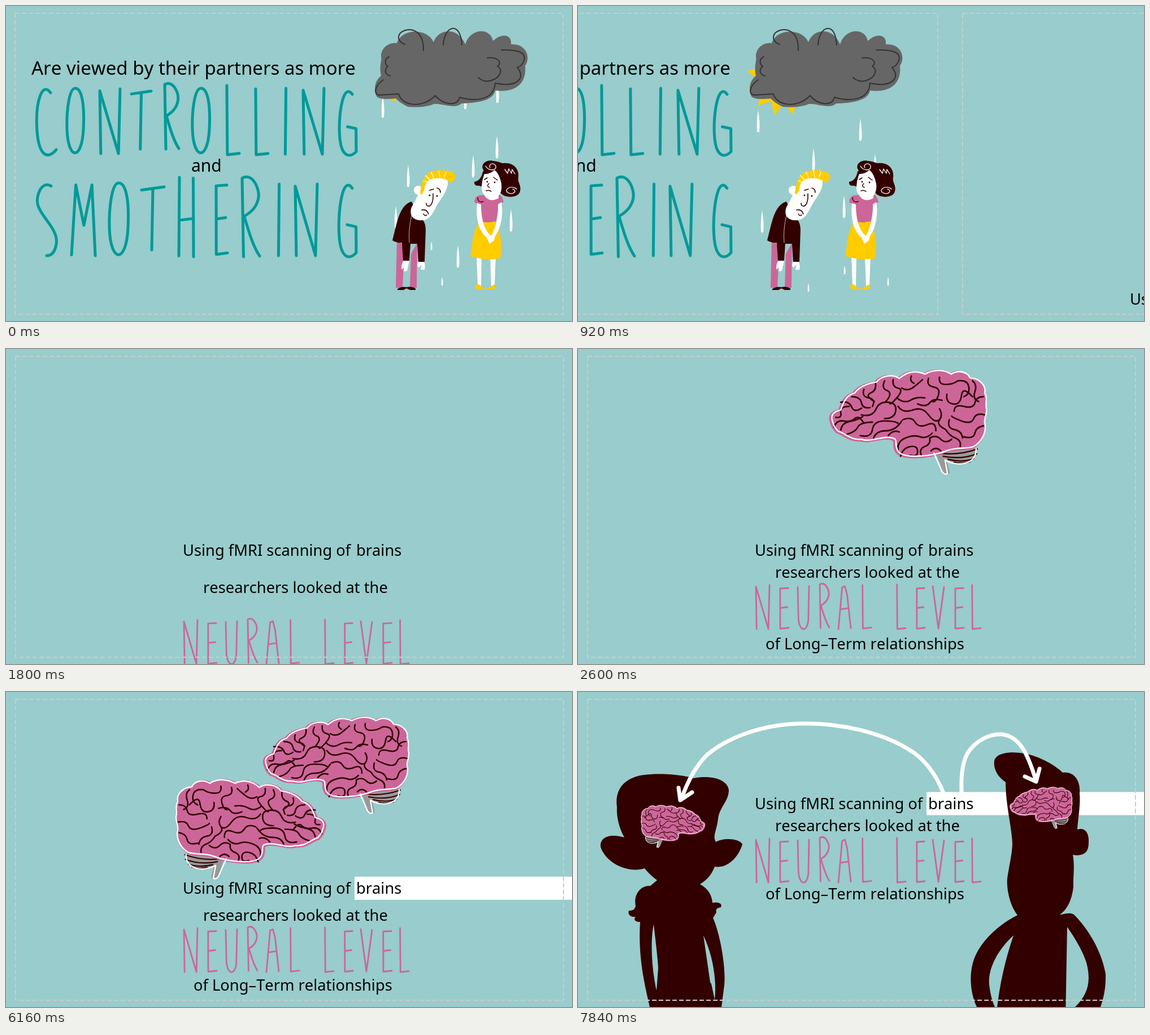
These frames come from a looping animation (1002x559 px, 8000 ms). An HTML page:

```html
<!DOCTYPE html>
<html lang="en">
<head>
<meta charset="utf-8">
<title>Relationships on a neural level</title>
<style>
  html, body { margin: 0; width: 100%; height: 100%; overflow: hidden; background: #9cc; }
  svg { display: block; width: 1002px; height: 559px; }
  text { font: 27.3px "Noto Sans", "Open Sans", sans-serif; font-kerning: none; }
  .big { font-size: 33px; }
  .line { fill: none; stroke-linecap: round; stroke-linejoin: round; }
  .border { fill: none; stroke: #ccc; stroke-width: 2; stroke-dasharray: 8 4; }
  .dark { fill: #300; }
  .white { fill: #fff; }
  .pink { fill: #c69; }
  .gold { fill: #fc0; }
</style>
</head>
<body>
<svg viewBox="0 0 1002 559">
  <defs>
    <path id="cortex" d="M461 130C456 118 463 112 474 110C478 98 483 85 497 82C505 70 520 66 533 64C540 54 558 50 570 58C586 44 600 46 612 51C628 42 645 44 655 51C668 43 682 48 686 57C702 58 713 70 710 82C716 92 710 98 713 108C714 120 707 125 711 135C712 152 702 164 692 170C680 174 665 171 650 176C625 186 574 192 567 176C562 166 567 160 562 157C545 150 524 164 508 158C490 160 482 148 470 145C465 140 462 135 461 130Z"/>
    <g id="brain">
      <path d="M629 178L643 216 653 214 648 194C662 203 697 202 698 171Z" fill="#999"/>
      <path class="line" stroke="#300" stroke-width="2.2" d="M636 181q32 4 62-7M642 186q30 6 55-4M650 191q24 6 42-1M660 196q14 3 26-1"/>
      <use href="#cortex" fill="#c69" stroke="#c69" stroke-width="5" transform="translate(-2 1)"/>
      <g class="line" stroke="#300" stroke-width="2.5">
        <path d="M466 122q10 2 8-8t14-10M474 97q14-2 18 8t16 2M463 138q4-12 16-10t18-4 14 6M474 143q2-12 14-14t22-8M484 150q14-4 18-12t24-8M492 88q14 0 16 10t14 8M512 76q-4 12 8 14t6 14M531 66q2 12-8 16t6 14M546 62q-6 12 4 16t-2 18"/>
        <path d="M508 118q18 4 24-10t24-10M556 98q10 2 8 14t-18 12M506 152q18 4 20-10t20-14 22 4M528 156q4-12 20-12t26-16M552 152q8-10 18-6M560 60q-2 12 8 14t-2 16-12 8M566 90q12 10 22 4t24-4M574 74q10 6 20-2t14-12M590 54q-4 8 4 12M568 104q8 12 24 6t26 8 18 8M576 126q14-6 20 4t20 4 14 10M600 100q14 6 20-2t20-4"/>
        <path d="M618 58q-4 12 8 14t8 14-10 10M636 56q-2 12 10 12t20-6M666 62q16-2 18 10t-8 16M648 84q-2 14 10 16t14-14 18 2M690 62q8 6 4 18t6 16M708 88q-12 0-14 10t-18 6-16 8M710 118q-14-4-18 6t-20 4-16-8M636 108q6 10 0 18t10 16M652 126q-4 14 8 16t14 14M708 136q-12 2-14 12t-18 6M670 170q2-10-8-14t-16-14"/>
        <path d="M568 176q-2-14 12-20t24-2 20-6M572 186q4-14 16-16t12 8-12 6M606 184q-4-10 6-14t8-14M620 156q10-6 18 2t18 0M622 177q8-8 16 0"/>
      </g>
      <g class="line" stroke="#fff" stroke-width="2.2">
        <use href="#cortex"/>
        <path d="M627 181L640 211Q645 218 649 214L645 192C662 203 697 202 696 173"/>
      </g>
    </g>
    <path id="drop" class="white" d="M0-20Q4 5 2 18Q0 22-2 18Q-3 0 0-20Z"/>
  </defs>

  <g id="panel1">
    <text class="big" x="45" y="122">Are viewed by their partners as more</text>
    <text x="328" y="294" style="font-size:30px">and</text>
    <g id="words" class="line" stroke="#099" stroke-width="5"></g>
    <polygon id="sun" class="gold"/>
    <g id="rain"></g>

    <path fill="#666" d="M692 66C700 40 745 38 757 64C765 40 800 36 813 68C822 38 858 38 862 62C880 46 896 52 894 68C920 66 930 90 919 106C922 135 905 155 866 150C862 172 820 172 806 173C795 184 770 172 757 174C745 180 722 180 712 179C700 174 692 166 690 164C676 166 656 166 655 158C650 142 656 130 664 124C660 105 666 98 664 90C664 72 680 64 692 66Z"/>
    <path class="line" stroke="#333" stroke-width="2" d="M706 68C695 64 692 55 698 48C712 36 740 40 739 79M774 69C776 34 805 26 807 69M877 78C905 77 922 82 917 97Q913 107 905 109C921 128 905 145 866 137M852 92C870 90 880 100 870 107C882 114 872 128 862 131C850 137 840 131 836 127M678 90C668 95 672 105 676 107C668 115 672 122 680 124M668 131C652 142 650 158 662 158L695 156C700 176 735 184 760 159C775 177 800 178 803 162C830 170 864 168 866 137"/>

    <g id="man">
      <path class="pink" d="M692 418L690 500H702L706 424ZM717 440L715 500H727L728 420Z"/>
      <path class="dark" d="M693 502Q700 497 709 499Q718 497 725 501V504H715L709 501 704 504H693Z"/>
      <path class="white" d="M704 450Q698 463 701 468L705 463 704 471 710 470 714 452ZM730 452Q726 463 731 464L736 459 734 468H741Q743 458 739 452Z"/>
      <path class="dark" d="M718 347C695 354 692 388 684 416Q692 421 701 420L703 452H714L716 422H728L730 454H741L743 398C743 384 738 378 733 377Z"/>
      <path d="M718 372Q712 398 714 420" class="line" stroke="#fff" stroke-width=".7"/>
      <circle class="white" cx="730" cy="327" r="8"/>
      <path class="white" d="M743 306C736 320 729 338 718 357C712 374 724 382 738 380C752 379 757 364 765 350C776 334 787 318 780 304Z"/>
      <path class="gold" d="M733 332Q736 298 755 293C775 289 795 293 796 302Q795 310 787 314C780 306 765 303 750 308Q742 312 740 328L736 335Z"/>
      <path class="line" stroke="#fff" stroke-width="1.2" d="M739 310L748 314M743 301L750 308M753 295L757 305M766 293L768 303M779 295L776 304"/>
      <path class="line" stroke="#300" stroke-width="1.6" d="M756 333Q757 350 750 355Q744 356 744 350M736 362Q745 360 748 369M750 327L757 325M763 323Q769 324 769 331M739 369Q741 373 745 371"/>
      <circle class="dark" cx="750" cy="336" r="1.5"/><circle class="dark" cx="763" cy="337" r="1.5"/>
    </g>

    <g id="woman">
      <path class="white" d="M833 442H842L841 497H835ZM857 442H867L865 497H859Z"/>
      <path class="gold" d="M831 496Q834 490 842 498L848 502H832ZM849 502L859 498Q867 490 866 499L864 503Z"/>
      <path class="pink" d="M837 336Q828 340 830 349L838 352 840 386H867L873 352 881 348Q879 338 873 334Z"/>
      <path class="gold" d="M839 382Q852 386 866 382C876 400 879 425 875 448Q847 452 822 444C827 420 824 402 839 382Z"/>
      <path class="white" d="M834 350C831 380 838 400 851 411L856 422 864 416 866 408C876 395 881 370 877 348L871 352C872 375 866 395 859 408C846 398 841 375 841 352Z"/>
      <path class="white" d="M847 336Q855 350 872 341V325H847Z"/>
      <path class="dark" d="M846 292C838 282 850 271 863 275C874 276 876 279 880 279C900 277 909 291 907 304C905 313 913 318 910 329C907 342 881 341 875 331L838 319Q828 320 829 312Q841 310 844 294Z"/>
      <path class="white" d="M847 298Q856 299 865 291Q873 297 877 315Q879 331 870 339C858 348 843 338 842 324Q842 310 847 298Z"/>
      <path class="line" stroke="#fff" stroke-width="1.3" d="M849 284C854 293 869 293 867 284C864 276 853 281 857 287M883 290L888 297 890 289 895 297 896 290 901 298M904 325C895 317 881 325 888 331C898 337 906 327 897 325"/>
      <path class="line" stroke="#300" stroke-width="1.5" d="M847 308L852 305M863 304L870 309M855 315Q850 320 856 322M850 328Q855 326 859 329M835 340Q836 350 845 347"/>
      <circle class="dark" cx="852" cy="312" r="1.4"/><circle class="dark" cx="865" cy="313" r="1.4"/>
    </g>
    <rect class="border" x="16" y="13" width="970" height="534"/>
  </g>

  <g id="panel2">
    <g id="line1">
      <rect id="bar" class="white" x="617" y="336.5" width="440" height="41"/>
      <text x="313" y="367">Using fMRI scanning of</text>
      <text x="620" y="367">brains</text>
    </g>
    <text id="line2" x="349" y="406">researchers looked at the</text>
    <g id="neural" class="line" stroke="#c69" stroke-width="2.8"></g>
    <text id="line4" x="332" y="530">of Long–Term relationships</text>
    <path id="manShade" class="dark" d="M737 122C740 108 765 104 795 110C820 116 845 130 858 143C880 140 890 160 888 180C890 200 885 225 884 244C898 240 905 250 904 268C904 285 895 292 876 289C880 310 876 330 877 345C875 365 868 385 853 395C860 395 870 390 878 395C895 412 925 450 934 500C935 525 930 545 925 559L910 640H864L880 559C905 535 908 510 900 480C892 455 875 430 866 417L862 640H735L742 559C748 510 758 470 771 432C745 455 725 490 728 520Q731 545 738 559L745 640H730L706 559C692 530 692 490 705 465C720 435 750 410 778 396C765 380 758 350 760 330C764 305 768 290 769 270C768 240 757 200 757 160C742 150 735 135 737 122Z"/>
    <path id="womanShade" class="dark" fill-rule="evenodd" d="M69 205C64 170 85 147 130 146C165 144 195 150 205 153C235 147 266 155 267 175C266 195 250 205 248 225C245 248 238 255 244 266C258 258 285 260 291 270C285 292 265 314 242 310C236 325 228 334 216 341C232 350 237 362 238 374C250 372 256 376 253 382C248 383 243 384 245 391L239 401C252 430 262 490 259 520L254 559V640H135L127 559C118 520 106 470 110 408C100 408 98 403 102 399C92 400 88 394 90 388C98 388 100 386 102 380C98 360 110 343 128 344L140 334C128 325 122 318 118 313C90 322 50 305 40 275C38 258 55 250 82 258C72 240 68 220 69 205ZM134 412C137 440 141 470 142 490L139 530C130 490 128 440 134 412ZM222 432C238 465 246 510 242 546L236 518 234 515Z"/>
    <use id="brainR" href="#brain"/>
    <use id="brainL" href="#brain"/>
    <g class="line" stroke="#fff" stroke-width="7">
      <path id="arrowL" d="M646 177C635 150 618 125 595 108C540 70 460 55 400 56C330 56 265 80 228 112C205 135 190 170 183 190M178 170L181 192 202 178"/>
      <path id="arrowR" d="M679 177C678 150 680 125 690 108C705 85 730 74 750 75C780 78 795 105 811 158M791 150L811 159 817 136"/>
    </g>
    <rect class="border" x="17" y="13" width="970" height="534"/>
  </g>
</svg>
<script>
const LOOP = 8000, PANEL = 1013;
const $ = id => document.getElementById(id);
const move = (id, x, y) => $(id).setAttribute('transform', `translate(${x} ${y})`);
const mix = (a, b, k) => a + (b - a) * k;
const span = (t, start, length) => Math.min(1, Math.max(0, (t - start) / length));
const out = (t, start, length = 800) => 1 - (1 - span(t, start, length)) ** 3;
const back = (t, start, length = 800) => {
  const u = span(t, start, length) - 1;
  return 1 + 2.70158 * u ** 3 + 1.70158 * u ** 2;
};

// Tall hand-lettered capitals on a 100 x 100 cell.
const GLYPHS = {
  A: 'M0 100L30 3 52 0 70 20 100 98M15 54L80 51',
  C: 'M72 6C30 -12 0 20 4 55C8 102 55 110 100 93',
  E: 'M95 3L5 4 6 99 100 97M8 50L85 48',
  G: 'M76 5C25 -15 0 40 8 70C15 105 65 105 97 95L96 59 50 56',
  H: 'M4 0L0 99M98 1L100 100M4 54L96 52',
  I: 'M60 0L40 100',
  L: 'M4 0L8 100 100 98',
  M: 'M0 99L18 2 52 58 86 2 100 100',
  N: 'M5 100L0 3 92 100 100 0',
  O: 'M50 0C15 0 0 35 3 62C8 110 88 112 97 62C104 25 88 0 50 0Z',
  R: 'M8 100L0 1C60 -6 100 14 94 25Q85 40 12 49C40 70 65 88 100 99',
  S: 'M72 2C25 -6 -5 16 6 28C20 45 105 62 98 82Q90 100 50 100',
  T: 'M0 5L100 0M50 3L45 100',
  V: 'M0 0L50 100 100 2',
  U: 'M0 2L6 75C15 108 85 108 94 78L100 0'
};
function letter(host, [char, x, y, w, h]) {
  let isX = false;
  const d = GLYPHS[char].replace(/-?\d+/g, n => {
    isX = !isX;
    return isX ? x + n * w / 100 : y + n * h / 100;
  });
  $(host).insertAdjacentHTML('beforeend', `<path d="${d}"/>`);
}
[
  ['C', 53, 147, 36, 116], ['O', 107, 146, 31, 116], ['N', 166, 147, 36, 115], ['T', 222, 151, 35, 103],
  ['R', 281, 138, 25, 116], ['O', 329, 146, 32, 116], ['L', 390, 141, 23, 123], ['L', 441, 147, 23, 117],
  ['I', 492, 146, 6, 117], ['N', 526, 146, 37, 117], ['G', 588, 151, 33, 113]
].forEach(g => letter('words', g));
[
  ['S', 54, 317, 36, 126], ['M', 116, 315, 42, 128], ['O', 182, 314, 35, 129], ['T', 240, 321, 40, 112],
  ['H', 306, 304, 26, 141], ['E', 371, 314, 21, 128], ['R', 418, 304, 31, 141], ['I', 480, 316, 6, 127],
  ['N', 512, 316, 39, 127], ['G', 587, 317, 34, 127]
].forEach(g => letter('words', g));
[
  ['N', 315, 419, 24, 78], ['E', 357, 422, 16, 75], ['U', 389, 421, 20, 76], ['R', 428, 417, 17, 78],
  ['A', 461, 421, 22, 76], ['L', 503, 419, 16, 77], ['L', 564, 418, 16, 79], ['E', 599, 422, 15, 75],
  ['V', 628, 421, 20, 75], ['E', 667, 422, 16, 75], ['L', 697, 419, 16, 78]
].forEach(g => letter('neural', g));

// Two showers take turns; each drop is x, y and optional size.
const FALL = 0.4, TURN = 368;
const drops = [
  [667, 178], [813, 163], [870, 152], [869, 250], [827, 284], [712, 301],
  [690, 374], [894, 380], [753, 425, .4], [800, 444], [772, 488, .4],
  ...[
    [668, 204], [849, 219], [766, 272], [875, 282], [777, 308],
    [675, 382], [820, 356], [821, 468, .4], [757, 499, .4], [898, 488, .4]
  ].map(([x, y, size]) => [x, y - TURN, size])
].map(([x, y, size = 1]) => {
  const el = document.createElementNS('http://www.w3.org/2000/svg', 'use');
  el.setAttribute('href', '#drop');
  $('rain').append(el);
  return { el, x, y, size };
});

$('sun').setAttribute('points', Array.from({ length: 24 }, (_, i) => {
  const a = (6 + i * 15) * Math.PI / 180, r = i % 2 ? 34 : 50;
  return `${r * Math.cos(a)},${r * Math.sin(a)}`;
}).join(' '));

function placeBrain(id, x, y, scale, flip) {
  $(id).setAttribute('transform',
    `translate(${x} ${y}) scale(${flip * scale} ${scale}) translate(-585.5 -131)`);
}

function draw(t) {
  const scroll = PANEL * out(t, 787, 1020);
  move('panel1', -scroll, 0);
  move('panel2', PANEL - scroll, 0);

  const glow = 1 + .3 * Math.sin(Math.PI * t / 1840) ** 2;
  $('sun').setAttribute('transform', `translate(712 130) scale(${glow}) rotate(${t / 120})`);
  for (const { el, x, y, size } of drops) {
    const fallen = ((y + FALL * t - 125) % (2 * TURN) + 2 * TURN) % (2 * TURN) + 125;
    el.setAttribute('transform', `translate(${x} ${fallen}) scale(${mix(1, size, .6)} ${size})`);
    el.style.display = fallen < 502 ? '' : 'none';
  }

  const rise = (id, depth, enter, leave, lift) =>
    move(id, 0, depth * (1 - out(t, enter)) - lift * out(t, leave));
  rise('line1', 222, 843, 6146, 159);
  rise('line2', 180, 1424, 6380, 159);
  rise('neural', 145, 1604, 6532, 159);
  rise('line4', 57, 2104, 6686, 162);
  move('bar', 400 * (1 - out(t, 3360, 720)), 0);

  move('manShade', 0, 460 * (1 - back(t, 6160, 660)));
  move('womanShade', 0, 415 * (1 - back(t, 6734)));

  const right = out(t, 6272), left = out(t, 6750);
  placeBrain('brainR', mix(585.5, 820, right), mix(131, 206, right),
    back(t, 2250, 500) * mix(1, .43, right), 1);
  placeBrain('brainL', mix(432.5, 168, left), mix(244.5, 239, left),
    back(t, 2800, 520) * mix(1.03, .44, left), -1);

  move('arrowR', 0, -200 * (1 - out(t, 7000, 700)));
  move('arrowL', 0, -220 * (1 - out(t, 7120, 720)));
}

function frame() {
  draw(performance.now() % LOOP);
  requestAnimationFrame(frame);
}
frame();
</script>
</body>
</html>
```
